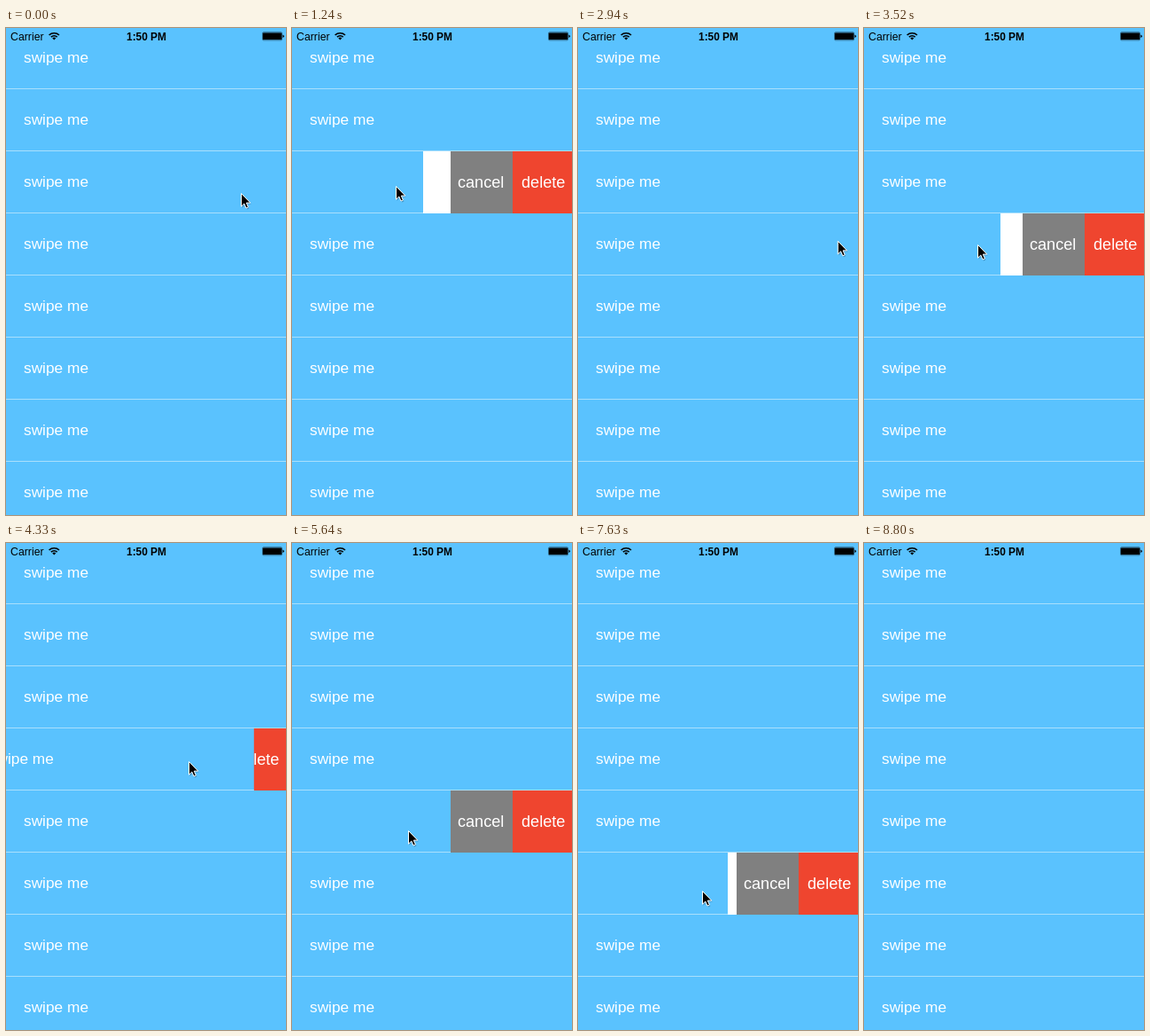
Animation of 316 by 549 pixels, one loop 9.37 s. Source, as an HTML page:

```html
<!DOCTYPE html>
<html lang="en">
<head>
<meta charset="utf-8">
<title>Swipe rows</title>
<style>
  html, body { margin: 0; width: 100%; height: 100%; overflow: hidden; background: #5ac2fe; }
  svg { display: block; width: 316px; height: 549px; }
  text { font-family: "Liberation Sans", Arial, sans-serif; }
  .label { font-size: 17.3px; fill: #fff; }
  .button { font-size: 18.1px; fill: #fff; }
</style>
</head>
<body>
<svg viewBox="0 0 316 549">
  <g id="rows"></g>
  <g id="status">
    <text x="5" y="14" font-size="12.3">Carrier</text>
    <g fill="none" stroke="#000" stroke-width="1.7">
      <path d="M48.6 8A8.3 8.3 0 0 1 60 8"/>
      <path d="M50.9 10.2A5 5 0 0 1 57.7 10.2"/>
    </g>
    <path d="M52.3 11.4A3 3 0 0 1 56.3 11.4L54.3 13.5Z"/>
    <text x="158.5" y="14" font-size="11.9" font-weight="bold" text-anchor="middle">1:50 PM</text>
    <rect x="289.5" y="4.8" width="22" height="9" rx="1.3" fill="none" stroke="#000" stroke-opacity=".5"/>
    <rect x="290" y="5.5" width="21" height="7.6" rx=".6"/>
    <path d="M312.3 7.6Q313.8 8 313.8 9.3T312.3 11Z"/>
  </g>
  <g id="cursor">
    <path d="M.5 .5V15.2L3.8 12L6 17L8.4 16L6.3 11.1H10.8Z" opacity=".22" transform="translate(1 1.5)"/>
    <path d="M.5 .5V15.2L3.8 12L6 17L8.4 16L6.3 11.1H10.8Z" stroke="#fff"/>
  </g>
</svg>
<script>
  const LOOP = 9370, ROW = 70, TOP = -1, BUTTON = 70, WIDTH = 320;
  const HOLD = 120, SNAP = 240, TRAVEL = 370, REST = 140;
  const $ = id => document.getElementById(id);
  const clamp = v => Math.min(1, Math.max(0, v));
  const mix = (a, b, k) => a + (b - a) * k;
  const smooth = k => k * k * (3 - 2 * k);
  const settle = k => 1 - (1 - clamp(k)) ** 3;
  const point = (t, x, y) => ({ t, x, y });

  // Each swipe: grab a row, pull it open, rest on the tap point, then close it
  const swipes = [
    { row: 2, grab: point(760, 288, 182), pull: point(1240, 117, 178), tap: point(1890, 240, 181), close: 2300 },
    { row: 3, grab: point(2960, 293, 240), pull: point(3420, 128, 244), tap: point(3920, 206, 246), close: 4248 },
    { row: 4, grab: point(4880, 290, 322), pull: point(5270, 131, 324), tap: point(6410, 173, 319), close: 6498 },
    { row: 5, grab: point(7360, 290, 388), pull: point(7600, 140, 392), tap: point(7980, 140, 392), close: 8090 }
  ];

  const path = [
    point(0, 265, 186), point(540, 265, 186),
    ...swipes.flatMap(({ grab, pull, tap, close }) => [
      grab, pull, { ...pull, t: tap.t - TRAVEL }, tap, { ...tap, t: close + REST }
    ]),
    point(8790, 215, 555), point(LOOP, 215, 555)
  ];

  function pointerAt(t) {
    const i = path.findIndex(p => p.t > t);
    const a = path[i - 1], b = path[i];
    const k = smooth((t - a.t) / (b.t - a.t));
    return { x: mix(a.x, b.x, k), y: mix(a.y, b.y, k) };
  }

  function offsetAt({ grab, pull, close }, t) {
    const release = pull.t + HOLD;
    if (t < grab.t) return 0;
    if (t < release) return pointerAt(t).x - grab.x;
    const open = mix(pull.x - grab.x, -2 * BUTTON, settle((t - release) / SNAP));
    return open * (1 - settle((t - close) / SNAP));
  }

  function add(parent, tag, attrs, text = '') {
    const el = document.createElementNS('http://www.w3.org/2000/svg', tag);
    for (const key in attrs) el.setAttribute(key, attrs[key]);
    el.textContent = text;
    return parent.appendChild(el);
  }

  function addButton(row, x, fill, label, inset) {
    add(row, 'rect', { x, width: BUTTON, height: ROW, fill });
    add(row, 'text', { x: x + inset, y: 41, class: 'button' }, label);
  }

  const cells = Array.from({ length: 8 }, (_, i) => {
    const row = add($('rows'), 'g', { transform: `translate(0 ${TOP + i * ROW})` });
    add(row, 'rect', { width: WIDTH, height: ROW, fill: '#fff' });
    addButton(row, 179, '#808080', 'cancel', 8);
    addButton(row, 249, '#ef452f', 'delete', 10);
    const cell = add(row, 'g', {});
    add(cell, 'rect', { x: -1, width: WIDTH, height: ROW, fill: '#5ac2fe' });
    add(cell, 'rect', { x: -1, y: ROW - 1, width: WIDTH, height: 1, fill: '#a9dffc' });
    add(cell, 'text', { x: 20, y: 40, class: 'label' }, 'swipe me');
    return cell;
  });

  const place = (el, x, y) => el.setAttribute('transform', `translate(${x} ${y})`);
  const start = performance.now();

  function draw() {
    const t = (performance.now() - start) % LOOP;
    for (const s of swipes) place(cells[s.row], offsetAt(s, t), 0);
    const { x, y } = pointerAt(t);
    place($('cursor'), x, y);
    requestAnimationFrame(draw);
  }
  draw();
</script>
</body>
</html>
```
